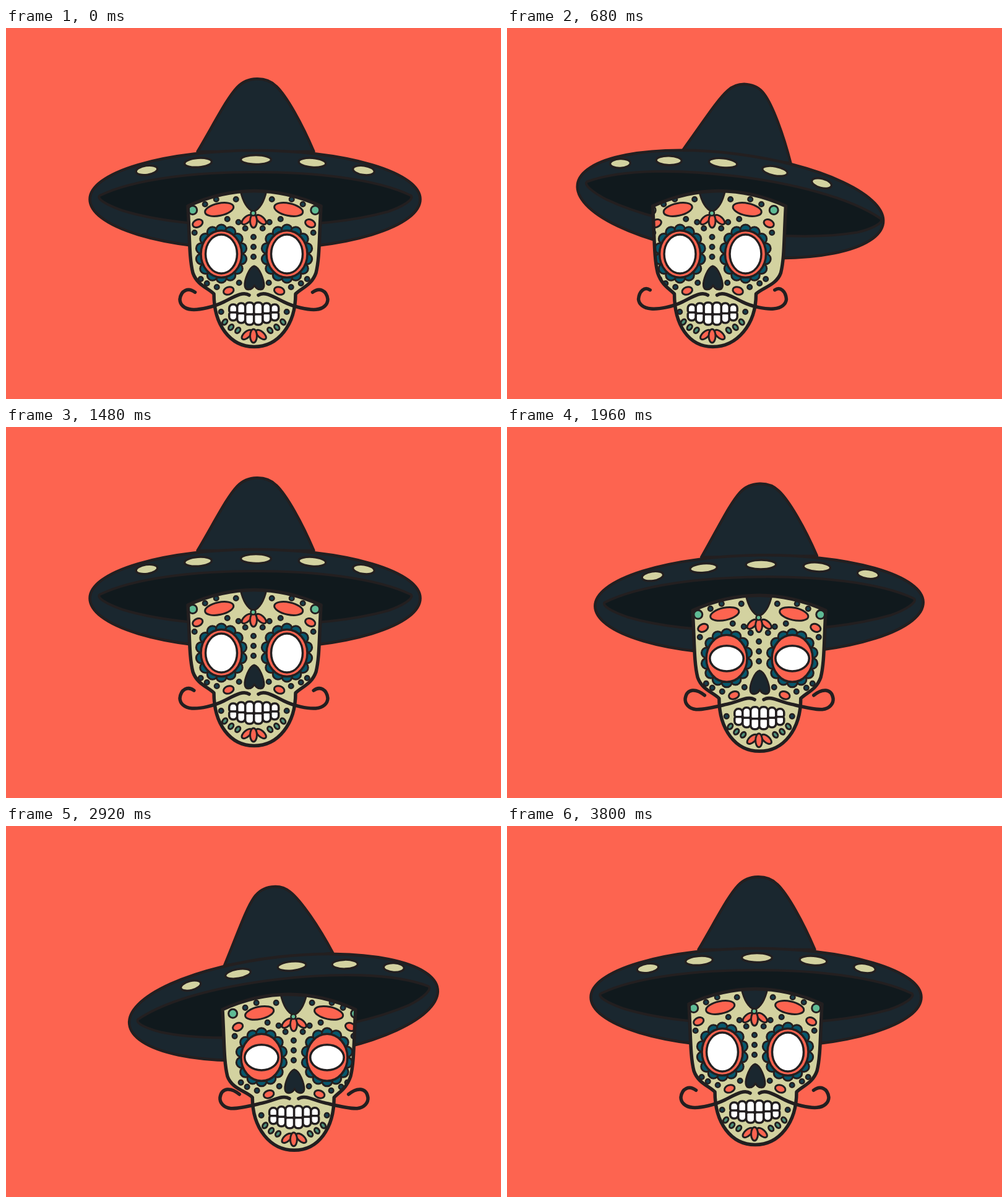
Write an HTML page with a canvas that moves like this. It is 800 px wide and 600 px high and loops after 3840 ms.

```html
<!DOCTYPE html>
<html lang="en">
<head>
<meta charset="utf-8">
<title>Sugar skull</title>
<style>
  html, body { margin: 0; width: 100%; height: 100%; overflow: hidden; background: #fd6450; }
  canvas { display: block; }
</style>
</head>
<body>
<canvas id="stage" width="800" height="600"></canvas>
<script>
const ctx = document.getElementById('stage').getContext('2d');
const LOOP = 3840, TURN = 960, MOVE = 320, STEP = 40;
const INK = '#231f20', HAT = '#1a272f', BRIM = '#10191d', BONE = '#d3d2a0';
const RED = '#fd6450', TEAL = '#5fbb95', BLUE = '#07576c', BEAD = '#173f4e';
const MID = 400.7;
const stops = [0, -1, 0, 1, 0];

// The head swings along this dip at constant speed.
const swing = document.createElementNS('http://www.w3.org/2000/svg', 'path');
swing.setAttribute('d', 'M0 0Q50 70 100 0');
const swingLength = swing.getTotalLength();

const lerp = (a, b, k) => a + (b - a) * k;

function paint(path, fill, width, stroke = INK) {
  if (fill) { ctx.fillStyle = fill; ctx.fill(path); }
  if (width) { ctx.strokeStyle = stroke; ctx.lineWidth = width; ctx.stroke(path); }
}

function oval(x, y, rx, ry, fill, width = 3, angle = 0) {
  const path = new Path2D();
  path.ellipse(x, y, rx, ry, angle * Math.PI / 180, 0, 7);
  paint(path, fill, width);
}

function pair(d, y, rx, ry, fill, width, angle = 0) {
  oval(MID - d, y, rx, ry, fill, width, angle);
  oval(MID + d, y, rx, ry, fill, width, -angle);
}

// Piecewise linear curve through [time, value] keys.
function keyed(keys, t) {
  const i = keys.findIndex(k => k[0] > t);
  const [a, b] = [keys[i - 1], keys[i]];
  return lerp(a[1], b[1], (t - a[0]) / (b[0] - a[0]));
}
const curlKeys = [[0, .75], [40, .95], [200, 1], [280, .1], [520, .7], [680, .58], [920, .75], [961, .75]];

const cone = new Path2D('M-93-77C-62-130-45-164-29-181C-12-199 18-199 34-183C51-167 76-122 95-77Z');
const brim = new Path2D('M-267 0A267 79 0 0 1 267 0A267 81 0 0 1-267 0Z');
const underside = new Path2D('M-251-6C-193-34-92-44 0-44S194-34 252-6C258 0 238 12 215 20C150 38 70 43 0 43S-150 38-215 18C-240 9-257-1-251-6Z');
const hair = new Path2D('M378 258C382 280 390 293 400 297C410 293 418 280 422 258Z');
const nose = new Path2D('M401 385C393 387 385 408 386 417C387 425 397 425 401.5 416C406 425 416 425 417 417C417 408 410 387 401 385Z');

function drawHat(q, dip) {
  const tilt = Math.abs(q);
  ctx.save();
  ctx.translate(402.5 + q * (q < 0 ? 41.5 : 51), 277 + 7 * tilt + dip);
  ctx.rotate(-7.2 * q * Math.PI / 180);
  ctx.scale(1 - .067 * tilt, 1);
  paint(cone, HAT, 4.5);

  ctx.save();
  ctx.scale(1, 1 + .025 * tilt);
  paint(brim, HAT, 4.5);
  const stretch = Math.max(0, -q);
  ctx.translate(5 * stretch, 0);
  ctx.scale(1 + .02 * stretch, 1);
  paint(underside, BRIM, 4);
  ctx.restore();

  for (const [x, rx] of [[-175, 17.5], [-92, 22], [1.5, 24.5], [92.5, 22], [175.5, 17.5]]) {
    const k = (x + 23 * q) / 175;
    oval(175 * k, -64 + 17 * k * k, rx, 7.5, BONE, 3.5, 8 * k);
  }
  ctx.restore();
}

// The outline turns a little less than the face painted on it.
function skullOutline(q) {
  const a = -10 * q, b = -3 * q;
  return new Path2D(`M${294 + a} 288Q${401 + a} 239 ${509 + a} 288
    C${506 + a} 340 ${507 + a} 372 ${501 + a} 396C${494 + a} 416 ${478 + b} 420 ${468 + b} 430
    C${468 + b} 480 440 515.5 401 515.5
    S${336 + b} 480 ${336 + b} 430C${326 + b} 420 ${309 + a} 416 ${302 + a} 396
    C${296 + a} 372 ${297 + a} 340 ${294 + a} 288Z`);
}

function drawFlower(y) {
  pair(11.5, y - 2, 5, 10, RED, 3, 48);
  oval(400, y, 5.5, 11, RED);
}

function drawEyes(shut) {
  for (const x of [348, 454]) {
    for (let i = 0; i < 14; i++) {
      const a = (i + .5) * Math.PI / 7;
      oval(x + 33 * Math.cos(a), 365 + 38.5 * Math.sin(a), 8.5, 8.5, BLUE, 3);
    }
    oval(x, 365.5, 33, 38, RED, 3.5);
    oval(x, 365.5, 25.5 + 5 * shut, 31.5 * (1 - shut), '#fff', 3.5);
  }
}

function drawTeeth() {
  for (const [d, w, top, gum, bottom] of [[27, 13, 447, 460, 473], [14, 13, 445, 461.5, 477], [0, 14, 444, 463, 480]])
    for (const x of [MID - d - w, MID + d]) {
      const teeth = new Path2D();
      teeth.roundRect(x, top, w, gum - top, [6, 6, 3, 3]);
      teeth.roundRect(x, gum, w, bottom - gum, [3, 3, 6, 6]);
      paint(teeth, '#fff', 3.5);
    }
}

function drawFace(shut) {
  paint(hair, HAT, 3);
  pair(56, 293.5, 23.5, 10, RED, 3, -12);
  pair(99, 294.5, 7, 7, TEAL, 3);
  pair(91, 316, 8.5, 6, RED, 3, -25);
  for (const [d, y] of [[61, 277], [29, 277], [79, 285], [43, 309], [25, 314], [14, 324], [96, 331],
    [86, 406], [76, 413], [60, 419], [24, 412], [53, 459]])
    pair(d, y, 3.8, 3.8, BEAD, 2.5);
  for (const y of [338, 354, 370]) oval(400, y, 3.8, 3.8, BEAD, 2.5);
  drawFlower(312);
  oval(399.5, 299.5, 4, 4, TEAL, 2.5);
  drawEyes(shut);
  paint(nose, HAT, 3);
  pair(41, 425, 8.5, 6, RED, 3, -20);
  drawTeeth();
  for (const [d, y] of [[47, 475.5], [37, 484], [26, 489]]) pair(d, y, 3.5, 5, '#4c8f7b', 3, 38);
  drawFlower(498);
}

function drawMoustache(curl, lift) {
  const at = (x0, y0, x1, y1, bend = 0) =>
    `${lerp(x0, x1, curl)} ${lerp(y0, y1, curl) - lift - bend * curl * (1 - curl)} `;
  const side = new Path2D(`M393 432C383 425 368 435 352 ${443 - lift / 2}S`
    + at(316, 451, 312, 458) + at(306, 450, 298, 457)
    + 'C' + at(292, 449, 286, 456) + at(284, 446, 280, 447) + at(281, 438, 281, 439)
    + 'C' + at(279, 431, 284, 422) + at(278, 426, 300, 424, 30) + at(280, 424, 314, 436, 30));
  paint(side, null, 5.5);
  ctx.save();
  ctx.translate(801, 0);
  ctx.scale(-1, 1);
  paint(side, null, 5.5);
  ctx.restore();
}

function draw(t) {
  const turn = Math.floor(t / TURN), phase = t % TURN;
  const point = swing.getPointAtLength(swingLength * Math.min(1, phase / MOVE));
  const q = lerp(stops[turn], stops[turn + 1], point.x / 100);
  const dip = point.y / 35 * (turn < 2 ? 23 : 25);
  const shut = phase < 200 ? Math.sin(Math.PI * phase / 200) ** 2 : 0;

  ctx.fillStyle = RED;
  ctx.fillRect(0, 0, 800, 600);
  drawHat(q, dip);

  ctx.save();
  ctx.translate(q * (q < 0 ? 68.5 : 72), dip);
  const skull = skullOutline(q);
  paint(skull, BONE);
  ctx.save();
  ctx.clip(skull);
  drawFace(shut);
  ctx.restore();
  paint(skull, null, 5.5);
  drawMoustache(keyed(curlKeys, phase), dip);
  ctx.restore();
}

ctx.lineCap = ctx.lineJoin = 'round';
const start = performance.now();
function tick() {
  const t = (performance.now() - start) % LOOP;
  draw(Math.floor(t / STEP) * STEP);
  requestAnimationFrame(tick);
}
tick();
</script>
</body>
</html>
```
